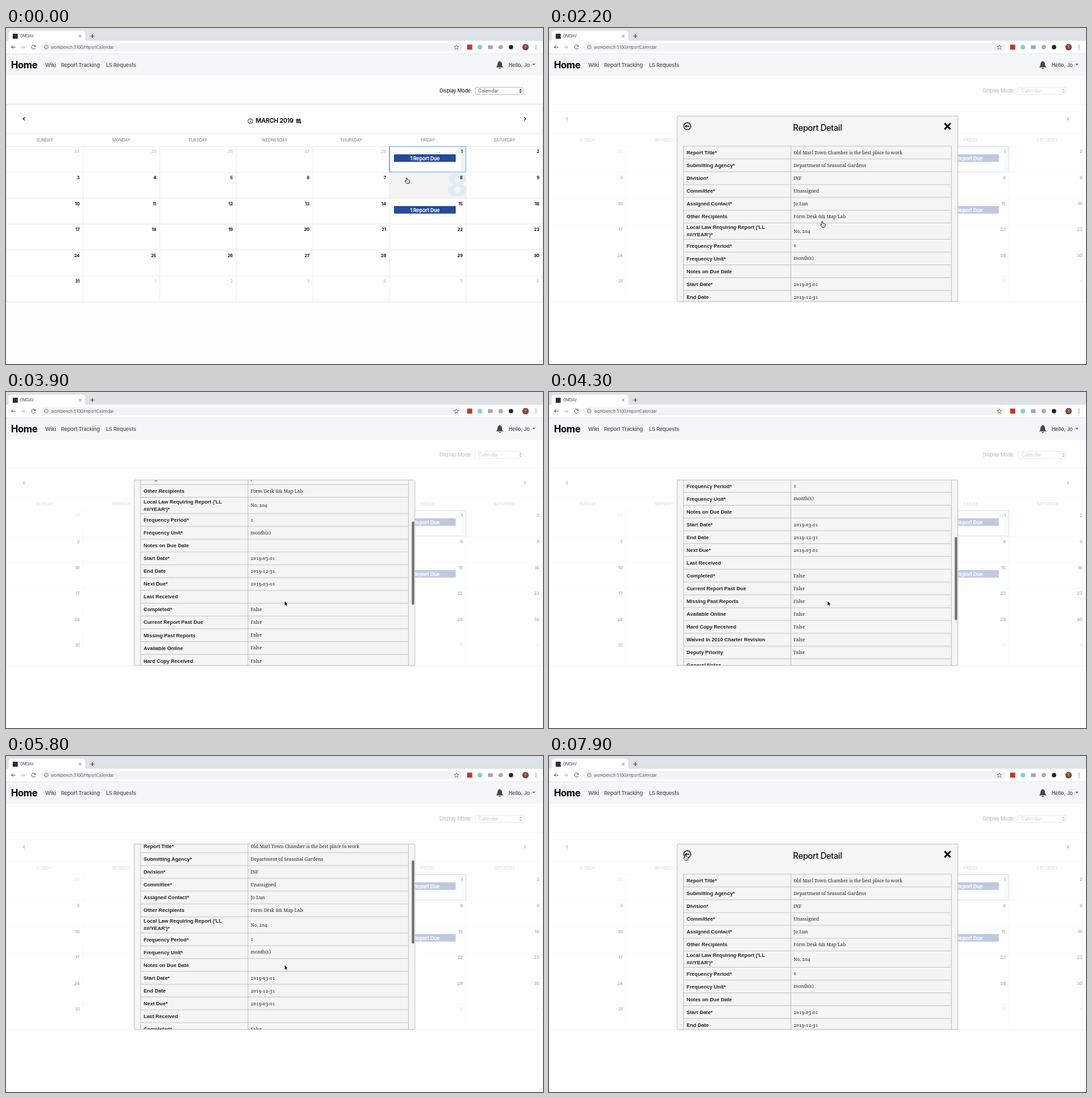
An HTML page for the animation above (8 s loop, 800 by 500 pixels).

```html
<!DOCTYPE html>
<html lang="en">
<head>
<meta charset="utf-8">
<title>Report calendar</title>
<style>
html, body { margin: 0; width: 100%; height: 100%; overflow: hidden; background: #fdfdfd; }
svg { display: block; width: 100vw; height: 100vh; }
text { font-family: Inter, sans-serif; letter-spacing: -.02em; white-space: pre; }
.label { font-family: "Liberation Sans", Arial, sans-serif; font-weight: 700; letter-spacing: 0; }
.value { font-family: "Noto Serif", serif; font-variant-numeric: oldstyle-nums; letter-spacing: 0; }
.head { font-weight: 500; letter-spacing: -.03em; }
.wide { letter-spacing: 0; }
</style>
</head>
<body>
<svg id="stage" viewBox="0 0 800 500" xmlns="http://www.w3.org/2000/svg"></svg>
<script>
const LOOP = 8000, STEP = 100;
const BLUE = '#254a9b', INK = '#111', LINE = '#bdbdbd';

// Markup helpers; text is placed by its vertical centre.
const attrs = o => Object.entries(o).map(([k, v]) => ` ${k}="${v}"`).join('');
const text = (x, y, s, size, o = {}) =>
  `<text${attrs({ x, y: (y + size * .36).toFixed(2), 'font-size': size, fill: INK, ...o })}>${s.replace(/&/g, '&amp;')}</text>`;
const mid = (x, y, s, size, o) => text(x, y, s, size, { 'text-anchor': 'middle', ...o });
const end = (x, y, s, size, o) => text(x, y, s, size, { 'text-anchor': 'end', ...o });
const rect = (x, y, width, height, fill, o = {}) => `<rect${attrs({ x, y, width, height, fill, ...o })}/>`;
const circle = (cx, cy, r, fill, o = {}) => `<circle${attrs({ cx, cy, r, fill, ...o })}/>`;
const path = (d, o = {}) => `<path${attrs({ d, fill: 'none', ...o })}/>`;
const stroke = (d, color, w = 1, o = {}) => path(d, { stroke: color, 'stroke-width': w, ...o });
const group = (id, body, o = {}) => `<g${attrs({ id, ...o })}>${body}</g>`;
const bold = { 'font-weight': 700 }, semi = { 'font-weight': 600 };

function browser() {
  const grey = '#5f6368';
  return rect(0, 0, 800, 19, '#dee1e6')
    + path('M2 19Q4 19 4 17V8Q4 4 8 4H114Q118 4 118 8V17Q118 19 120 19Z', { fill: '#fff' })
    + rect(10, 8.5, 7.5, 7.5, '#20303a')
    + text(21, 12, 'OMDAV', 5.7, { fill: '#45494d' })
    + stroke('M108.5 10l4 4m0-4l-4 4', grey, .8)
    + stroke('M125.5 12h6m-3-3v6', '#45494d', 1)
    + rect(0, 19, 800, 19, '#fff')
    + rect(51, 22.5, 629, 12, '#f1f3f4', { rx: 6 })
    + stroke('M14 28.5H8m2.8-2.8L8 28.5l2.8 2.8', grey, 1)
    + stroke('M22 28.5h6m-2.8-2.8l2.8 2.8l-2.8 2.8', '#b9bcc0', 1)
    + stroke('M43.4 26.6A3 3 0 1 0 43.9 29.3', grey, 1) + path('M44.3 25v3h-3z', { fill: grey })
    + circle(60, 28.5, 2.8, 'none', { stroke: grey, 'stroke-width': .7 })
    + stroke('M60 28.2v1.9M60 26.7v.8', grey, .7)
    + text(67, 28.7, 'workbench:5100/reportCalendar', 6.35, { fill: grey })
    + path('M671 25l1 2.4 2.6.2-2 1.7.6 2.5-2.2-1.4-2.2 1.4.6-2.5-2-1.7 2.6-.2z', { stroke: grey, 'stroke-width': .7 })
    + rect(687, 24.7, 7.6, 7.6, '#c0392b')
    + circle(706, 28.5, 3.6, '#7fd6c4')
    + rect(718, 25.7, 7, 5.6, '#a3a6a9')
    + circle(737, 28.5, 3.2, '#a9abae')
    + circle(752.3, 28.5, 3.3, '#222')
    + stroke('M763.5 23v11', '#dcdee0', .6)
    + circle(774, 28.5, 4.8, '#80463c') + mid(774, 28.6, 'Y', 4.8, { fill: '#fff' })
    + [25.7, 28.5, 31.3].map(y => circle(789.5, y, .75, grey)).join('');
}

function navbar() {
  const nav = { ...semi, fill: '#5e6166' };
  return rect(0, 38, 800, 33, '#f4f6f7') + stroke('M0 38.2H800', '#dfe1e3', .6)
    + text(7.4, 55, 'Home', 14.2, { ...bold, fill: '#000' })
    + text(58.5, 55, 'Wiki', 7.8, nav) + text(82, 55, 'Report Tracking', 7.8, nav)
    + text(149, 55, 'LS Requests', 7.8, nav)
    + path('M730.3 58.6q2-1.6 2-5q0-3 2.6-3.6v-1h1.4v1q2.6.6 2.6 3.6q0 3.4 2 5zM734 59.4h3.2q-.3 1.5-1.6 1.5t-1.6-1.5z', { fill: '#44474a' })
    + text(748.7, 54.7, 'Hello, Jo', 7.8, nav)
    + path('M784 53.2h4.8l-2.4 2.6z', { fill: '#5e6166' });
}

const COL = 114.15, ROW = 38.6, TOP = 176;
const cellX = c => .5 + c * COL, cellY = r => TOP + r * ROW;

// Large tinted numeral shown behind a hovered or selected cell.
function ghost(id, c, r, n) {
  const clip = `clip-${id}`;
  return `<clipPath id="${clip}">${rect(cellX(c), cellY(r), COL, ROW, '#000')}</clipPath>`
    + `<g clip-path="url(#${clip})">`
    + rect(cellX(c), cellY(r), COL, ROW, '#f4f4f4', { id })
    + group(id + '-num', end(687.5, cellY(r) + 19, n, 48, { 'font-weight': 800, fill: '#1a8fff', 'fill-opacity': .09 }))
    + '</g>';
}

const due = y => rect(578, y, 92, 11.3, BLUE, { rx: 1 })
  + mid(624, y + 5.8, '1 Report Due', 7.5, { ...bold, fill: '#fff' });

function calendar() {
  const days = ['SUNDAY', 'MONDAY', 'TUESDAY', 'WEDNESDAY', 'THURSDAY', 'FRIDAY', 'SATURDAY'];
  let s = end(694, 93.7, 'Display Mode:', 7.45)
    + rect(699.3, 88.3, 71, 10.6, '#fff', { stroke: '#a9a9a9', 'stroke-width': .7, rx: 1 })
    + text(703.5, 93.7, 'Calendar', 7.3, { fill: '#555' })
    + path('M764.5 92.8h4l-2-2.6zM764.5 94.4h4l-2 2.6z', { fill: '#333' })
    + rect(.5, 113.5, 799, 294, '#fefefe', { stroke: '#e7e7e7' })
    + ghost('hover8', 5, 1, '8') + ghost('hover1', 5, 0, '1')
    + stroke('M28 133l-2.2 2.2 2.2 2.2M772 133l2.2 2.2-2.2 2.2', INK, 1.2)
    + circle(364, 138.6, 3.5, 'none', { stroke: INK, 'stroke-width': .8 })
    + stroke('M364 138v2.5M364 136.5v.9', INK, 1)
    + text(372, 138.2, 'MARCH 2019', 9, bold)
    + rect(432.3, 135.6, 6.6, 5.8, '#333', { rx: .6 })
    + stroke('M433.9 134.6v1.6M437.3 134.6v1.6', '#333', 1)
    + stroke('M433 138h5M433 139.7h3', '#eee', .5)
    + circle(438.3, 140.8, 1.7, '#333', { stroke: '#fff', 'stroke-width': .5 })
    + stroke('M0 157.2H800M0 176.2H800', '#e9e9e9', .8);
  days.forEach((d, c) => s += mid(cellX(c) + COL / 2, 167, d, 6.1, { fill: '#777', class: 'wide' }));
  for (let r = 0; r < 6; r++) {
    if (r) s += stroke(`M0 ${cellY(r)}H800`, '#ededed', .8);
    for (let c = 0; c < 7; c++) {
      const n = r * 7 + c - 4, inside = n > 0 && n < 32;
      const label = n < 1 ? n + 28 : inside ? n : n - 31;
      s += end(cellX(c + 1) - 5, cellY(r) + 8.1, String(label), 6.5,
        inside ? bold : { fill: '#bdbdbd', 'font-weight': 500 });
    }
  }
  for (let c = 1; c < 7; c++) s += stroke(`M${cellX(c)} 176V407`, '#ededed', .8);
  return s + rect(571.3, 176.4, 113.7, 37.8, 'none', { stroke: '#82abea', 'stroke-width': 1 })
    + stroke('M571.5 176V214.5', '#5f92e0', 1.3) + due(188) + due(265);
}

const cross = (x, y, r) => stroke(`M${x - r} ${y - r}l${2 * r} ${2 * r}m0 ${-2 * r}l${-2 * r} ${2 * r}`, '#000', 2.6);
const REPORT = 'Old Marl Town Chamber is the best place to work';

const listModal = () => rect(200.5, 204, 399.2, 130.3, '#f5f5f5', { stroke: LINE, 'stroke-width': .9, rx: 1 })
  + mid(394, 221.5, 'Due Reports List', 12.6, { class: 'head' })
  + cross(584.2, 219, 4.4)
  + mid(400, 238.5, '(Click the title for more detail information)', 7.55)
  + rect(353, 254.5, 94.2, 16.5, '#fff', { stroke: '#2a52ad', 'stroke-width': 1.2, rx: 2 })
  + mid(400, 263, 'CREATE NEW REPORT', 7.1, { fill: '#2a4fa5' })
  + text(225, 288, '1', 7.6, semi)
  + text(267, 287.6, REPORT, 7.7, semi)
  + text(267, 299, 'Unassigned', 7.8, { class: 'value', 'font-weight': 700, fill: '#777' })
  + stroke('M267 312.6H552', LINE, .8);

const FIELDS = [
  ['Report Title*', REPORT], ['Submitting Agency*', 'Department of Seasonal Gardens'],
  ['Division*', 'INF'], ['Committee*', 'Unassigned'], ['Assigned Contact*', 'Jo Lun'],
  ['Other Recipients', 'Form Desk && Map Lab'],
  ["Local Law Requiring Report ('LL|##/YEAR')*", 'No. 204'],
  ['Frequency Period*', '1'], ['Frequency Unit*', 'month(s)'], ['Notes on Due Date', ''],
  ['Start Date*', '2019-03-01'], ['End Date', '2019-12-31'], ['Next Due*', '2019-03-01'],
  ['Last Received', ''], ['Completed*', 'False'], ['Current Report Past Due', 'False'],
  ['Missing Past Reports', 'False'], ['Available Online', 'False'], ['Hard Copy Received', 'False'],
  ['Waived in 2010 Charter Revision', 'False'], ['Deputy Priority', 'False'], ['General Notes', ''],
  ['Discrepancies', ''], ['Flagged as Obsolete By Lor', 'False'], ['Download', '']
];

function detailBody() {
  let y = 175.8, lines = `M200.5 ${y}H599.5`;
  let s = circle(206, 146.2, 5.2, 'none', { stroke: INK, 'stroke-width': 1.3 })
    + stroke('M209 146.2h-5', INK, 1.5) + path('M202.3 146.2l3-2.6v5.2z', { fill: INK })
    + mid(400, 148.7, 'Report Detail', 12.6, { class: 'head' })
    + cross(593.7, 146.2, 4.4);
  for (const [name, value] of FIELDS) {
    const parts = name.split('|'), h = parts.length > 1 ? 24.2 : 19.06;
    parts.forEach((p, i) => s += text(205, y + (parts.length > 1 ? 6.5 + 11 * i : 9.4), p, 7.6,
      { class: 'label', fill: '#222' }));
    if (value) s += text(364.5, y + h / 2, value, 6.9, { class: 'value', fill: '#222' });
    y += h;
    lines += `M200.5 ${y.toFixed(2)}H599.5`;
  }
  for (const x of [200.5, 360.5, 599.5]) lines += `M${x} 175.8V${y.toFixed(2)}`;
  return s + stroke(lines, LINE, .8)
    + rect(314, 677.9, 160, 19.8, BLUE, { rx: 1.5 })
    + mid(394, 688, 'Update the Report', 7.7, { ...semi, fill: '#fff' })
    + mid(400, 703.8, '(Upload the file through update)', 7.55);
}

const detailModal = () => '<clipPath id="pane"><rect x="191" y="131" width="418" height="276"/></clipPath>'
  + rect(191, 131, 418, 276, '#f5f5f5')
  + `<g clip-path="url(#pane)">${group('body', detailBody())}</g>`
  + rect(604.5, 0, 3.6, 124, '#707070', { id: 'thumb', rx: 1.8 })
  + rect(191, 131, 418, 276, 'none', { stroke: LINE, 'stroke-width': .9, rx: 1 });

const cursors = () =>
  group('arrow', path('M0 0V7.2L1.7 5.7L2.8 8.2L4 7.7L2.9 5.2H5.1Z', { fill: '#000', stroke: '#fff', 'stroke-width': .6 }))
  + group('hand', path('M-.8 .8Q0-.3 .8 .8V3.4Q1.6 2.9 2.2 3.6Q3 3.2 3.5 4Q4.5 3.7 4.5 5V6.6Q4.2 7.8 3.5 9H-.3Q-1.2 7.3-2.9 5.5Q-2.8 4.3-1.6 5L-.8 5.7Z',
    { fill: '#fff', stroke: '#111', 'stroke-width': .75 }) + stroke('M.8 6v1.7M2 6v1.7M3.1 6v1.7', '#111', .4));

const stage = document.getElementById('stage');
stage.innerHTML = rect(0, 0, 800, 500, '#fdfdfd') + calendar()
  + rect(0, 71, 800, 429, '#fff', { id: 'veil', 'fill-opacity': .7 })
  + browser() + navbar()
  + group('list', listModal()) + group('detail', detailModal()) + cursors();

// Tracks: [time, value...], interpolated linearly.
const pointer = [[0, 597, 222.5], [100, 597.3, 221], [300, 599, 209], [600, 602, 193], [800, 602, 193],
  [1100, 602, 205], [1300, 530, 242], [1500, 422, 282], [1600, 407, 287.5], [2400, 407, 287.5],
  [2700, 415, 311], [6200, 415, 311], [6400, 478, 268], [6600, 612, 176], [6700, 621, 154],
  [6900, 450, 158], [7100, 287.5, 177], [7300, 257, 156.5], [7400, 257, 156.5],
  [7600, 232, 151], [7800, 207, 147], [7900, 203, 146.3]];
const scroll = [[3200, 0], [3300, 5.2], [3500, 42], [3700, 94], [3900, 133.5], [4100, 148],
  [4200, 156], [4400, 212], [4600, 281], [4800, 324], [4900, 331.6], [5200, 331.6], [5300, 318],
  [5500, 216], [5700, 102], [5800, 51], [5900, 0]];
const thumbAlpha = [[1900, 1], [2200, 0], [3200, 0], [3300, 1], [6200, 1], [6600, 0]];
const hover8 = [[200, 1], [500, 0]], hover1 = [[200, 0], [500, 1], [700, 1], [800, 0]];

function at(track, t) {
  const i = track.findIndex(k => k[0] > t);
  if (i === 0) return track[0].slice(1);
  if (i < 0) return track[track.length - 1].slice(1);
  const a = track[i - 1], b = track[i], u = (t - a[0]) / (b[0] - a[0]);
  return a.slice(1).map((v, j) => v + (b[j + 1] - v) * u);
}

const el = id => document.getElementById(id);
const set = (id, name, value) => el(id).setAttribute(name, value);
const show = (id, on) => set(id, 'visibility', on ? 'visible' : 'hidden');

function draw(ms) {
  const t = Math.floor(ms % LOOP / STEP) * STEP;
  const [x, y] = at(pointer, t), [top] = at(scroll, t);
  const isHand = t < 800 || (t >= 1500 && t < 2500) || t >= 7700;
  const h8 = at(hover8, t)[0];

  set('hover8', 'opacity', h8);
  set('hover8-num', 'opacity', h8);
  set('hover1', 'opacity', at(hover1, t)[0]);
  show('veil', t >= 800);
  show('list', t >= 800 && t < 1700);
  show('detail', t >= 1700);
  set('body', 'transform', `translate(0 ${-top})`);
  set('thumb', 'y', 132.2 + top * .4535);
  set('thumb', 'opacity', at(thumbAlpha, t)[0]);
  for (const id of ['arrow', 'hand']) set(id, 'transform', `translate(${x} ${y})`);
  show('hand', isHand);
  show('arrow', !isHand);
}

const start = performance.now();
function tick() {
  draw(performance.now() - start);
  requestAnimationFrame(tick);
}
tick();
</script>
</body>
</html>
```
